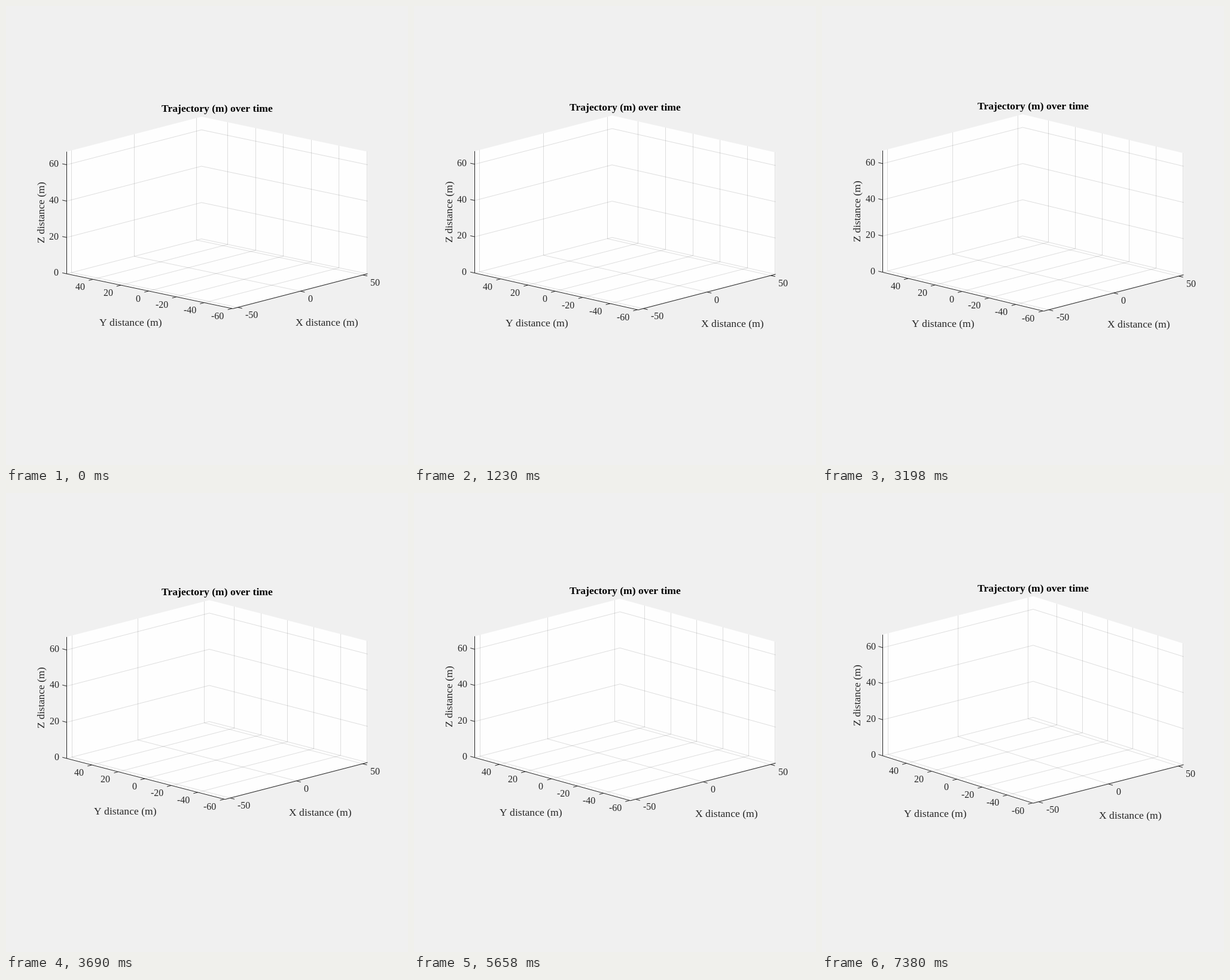
Animation of 672x768 px, one loop 8000 ms. Source, as an HTML page with a canvas:

```html
<!DOCTYPE html>
<html lang="en">
<head>
<meta charset="utf-8">
<title>Rotating 3D axes</title>
<style>
html, body { margin: 0; width: 100%; height: 100%; overflow: hidden; background: #f0f0f0; }
canvas { display: block; }
</style>
</head>
<body>
<canvas id="stage" width="672" height="768"></canvas>
<script>
const ctx = document.getElementById('stage').getContext('2d');
const LOOP = 8000, HOLD = 1230;
const INK = '#262626', GRID = 'rgba(38,38,38,0.15)';
const FONT = '"Liberation Serif", "Times New Roman", serif';

// Axis limits in metres; the plot box always spans the same screen width
const X_MIN = -53.9, X_MAX = 53.75, Y_MIN = -60.55, Y_MAX = 58.98, Z_MAX = 67.2;
const LEFT = 101.5, RIGHT = 604.5, CENTER_Y = 345.9;

// Each tick is [value, fraction along its axis]
const X_TICKS = [-50, 0, 50].map(v => [v, (v - X_MIN) / (X_MAX - X_MIN)]);
const Y_TICKS = [40, 20, 0, -20, -40, -60].map(v => [v, (Y_MAX - v) / (Y_MAX - Y_MIN)]);
const Z_TICKS = [0, 20, 40, 60].map(v => [v, v / Z_MAX]);

const mix = (a, b, f) => [a[0] + (b[0] - a[0]) * f, a[1] + (b[1] - a[1]) * f];
const lift = (p, h) => [p[0], p[1] - h];

// Orthographic view: the camera turns by 1 degree and rises by half a degree per step
function project(step) {
  const az = (48 - step) * Math.PI / 180, el = (13.5 + step / 2) * Math.PI / 180;
  const sin = Math.sin(az), cos = Math.cos(az), tilt = Math.sin(el);
  const xLen = X_MAX - X_MIN, yLen = Y_MAX - Y_MIN;
  const scale = (RIGHT - LEFT) / (xLen * cos + yLen * sin);
  const xDrop = scale * xLen * sin * tilt, yDrop = scale * yLen * cos * tilt;
  const height = scale * Z_MAX * Math.cos(el);
  const frontX = LEFT + scale * yLen * sin;
  const frontY = CENTER_Y + (xDrop + yDrop + height) / 2;
  return {
    height,
    front: [frontX, frontY],
    left: [LEFT, frontY - yDrop],
    right: [RIGHT, frontY - xDrop],
    back: [LEFT + RIGHT - frontX, frontY - xDrop - yDrop],
  };
}

function line(color, ...points) {
  ctx.strokeStyle = color;
  ctx.beginPath();
  points.forEach(([x, y]) => ctx.lineTo(x, y));
  ctx.stroke();
}

function vertical(color, [x, y], h) {
  const sx = Math.floor(x) + 0.5;
  line(color, [sx, y], [sx, y - h]);
}

// anchor: 0 = left, 0.5 = centre, 1 = right; text starts on whole pixels
function text(str, x, y, anchor, size = 16, color = INK, weight = '') {
  ctx.font = `${weight} ${size}px ${FONT}`;
  ctx.fillStyle = color;
  ctx.fillText(str, Math.round(x - anchor * ctx.measureText(str).width), Math.round(y));
}

// Short mark at p, pointing from a towards b
function tick(p, a, b) {
  const dx = b[0] - a[0], dy = b[1] - a[1], k = 7.5 / Math.hypot(dx, dy);
  line(INK, p, [p[0] + dx * k, p[1] + dy * k]);
}

function draw(step) {
  const { left, front, right, back, height } = project(step);

  ctx.fillStyle = '#f0f0f0';
  ctx.fillRect(0, 0, 672, 768);
  ctx.fillStyle = '#fefefe';
  ctx.beginPath();
  [left, front, right, lift(right, height), lift(back, height), lift(left, height)]
    .forEach(([x, y]) => ctx.lineTo(x, y));
  ctx.fill();

  for (const [, f] of Y_TICKS) {
    const p = mix(back, right, f);
    line(GRID, mix(left, front, f), p);
    vertical(GRID, p, height);
  }
  for (const [, f] of X_TICKS) {
    const p = mix(left, back, f);
    line(GRID, mix(front, right, f), p);
    vertical(GRID, p, height);
  }
  for (const [, f] of Z_TICKS)
    line(GRID, ...[left, back, right].map(p => lift(p, height * f)));

  line(INK, left, front, right);
  vertical(INK, left, height);

  for (const [v, f] of Y_TICKS) {
    const p = mix(left, front, f);
    tick(p, right, front);
    text(v, p[0] - 13.5, p[1] + 18, 1);
  }
  for (const [v, f] of X_TICKS) {
    const p = mix(front, right, f);
    tick(p, left, front);
    text(v, p[0] + 12.6, p[1] + 18, 0);
  }
  for (const [v, f] of Z_TICKS) {
    const p = lift(left, height * f);
    tick(p, front, left);
    text(v, 88 + step / 4, p[1] + 3.3, 1);
  }

  text('Trajectory (m) over time', 353, 177 - 2 * step, 0.5, 17.6, '#000', 'bold');
  text('Y distance (m)', 208.5 - 3.2 * step, 534.8 + 1.2 * step, 0.5, 17.6);
  text('X distance (m)', 536.2 - 3.5 * step, 535 + 1.72 * step, 0.5, 17.6);
  ctx.save();
  ctx.translate(63.5, Math.round(346.3 - 1.25 * step));
  ctx.rotate(-Math.PI / 2);
  text('Z distance (m)', 0, 0, 0.5, 17.6);
  ctx.restore();
}

function frame() {
  draw(Math.floor(performance.now() % LOOP / HOLD));
  requestAnimationFrame(frame);
}
frame();
</script>
</body>
</html>
```
